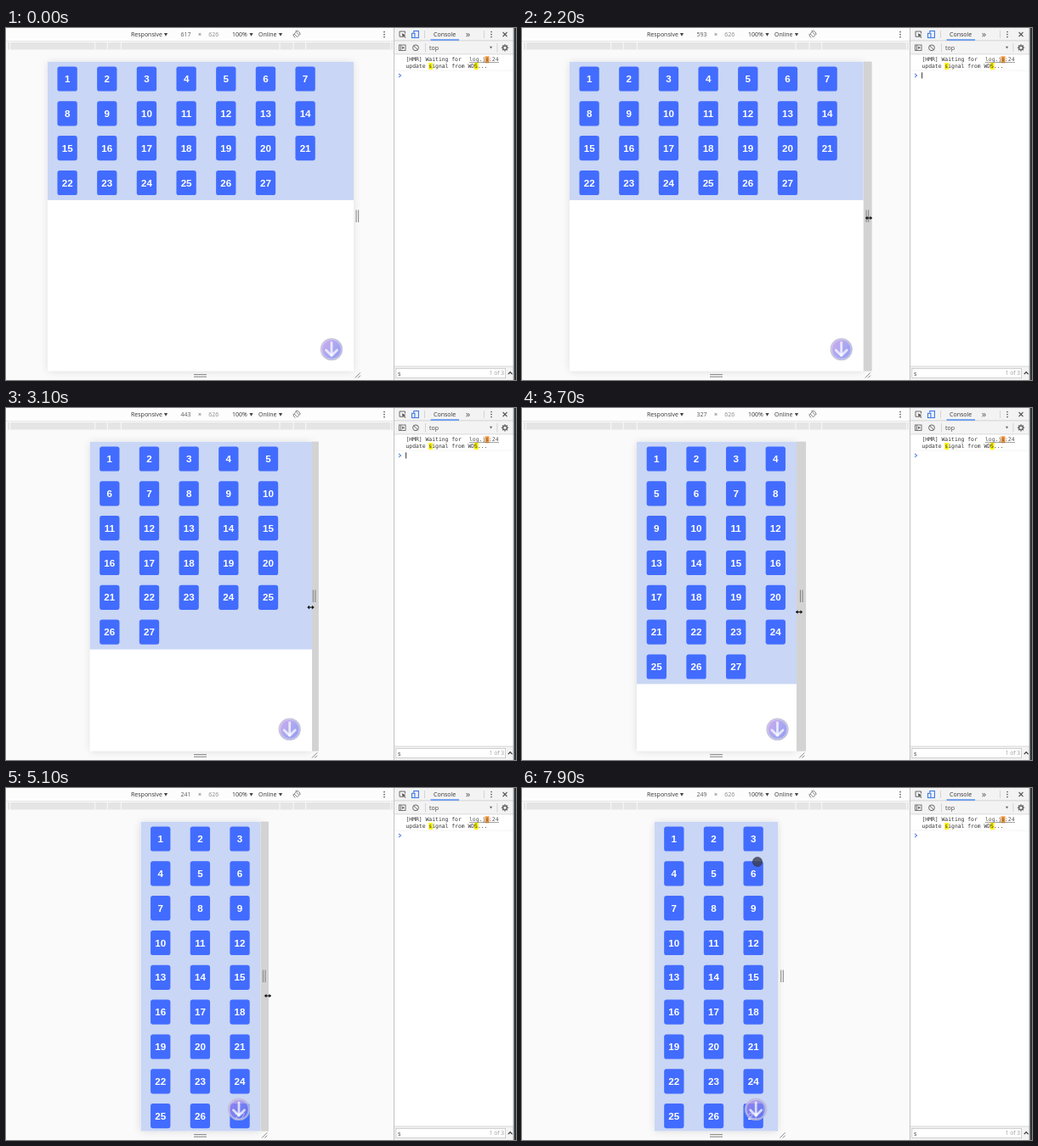
Write an HTML page with a canvas that moves like this. It is 600 px wide and 415 px high and loops after 8 s.

```html
<!DOCTYPE html>
<html lang="en">
<head>
<meta charset="utf-8">
<title>Responsive grid</title>
<style>
html, body { margin: 0; width: 100%; height: 100%; overflow: hidden; background: #fafafa; }
canvas { display: block; width: 600px; height: 415px; }
</style>
</head>
<body>
<canvas id="stage"></canvas>
<script>
const LOOP = 8000, STEP = 100, SCALE = 0.5833;
const TOP = 39.6, BOTTOM = 404.6, MID = 228.7;
const UI = '"Open Sans", "Noto Sans", sans-serif';
const MONO = '"DejaVu Sans Mono", monospace';
const BOLD = '"Liberation Sans", Arial, sans-serif';

const canvas = document.getElementById('stage');
const ratio = window.devicePixelRatio || 1;
canvas.width = 600 * ratio;
canvas.height = 415 * ratio;
const c = canvas.getContext('2d');
c.scale(ratio, ratio);

// time, shown width, page left, page right, button x
const sizes = [
  [2000, 617, 48.8, 409, 383],
  [2200, 593, 55.8, 401.8, 375.7],
  [2800, 502, 82, 376, 350],
  [3100, 443, 98.5, 360, 333.7],
  [3700, 327, 135, 323, 300.5],
  [4100, 277, 148, 309.5, 284],
  [4600, 248, 156.4, 301, 275.3],
  [5100, 241, 158.4, 299.6, 274],
  [5500, 241, 158.4, 299.6, 274],
  [5800, 249, 155.5, 301, 275.2]
];
// time, x, y
const pointer = [
  [1100, 590, 300], [1400, 480, 250], [1700, 414, 223], [2000, 414, 223],
  [2200, 408, 224], [2800, 380, 231], [3100, 358.5, 235], [3700, 326, 240.5],
  [4600, 309, 244], [5100, 308, 245], [5500, 308, 245], [5800, 311, 244],
  [6400, 208, 36], [6500, 201, 27], [7200, 201, 27], [7900, 277, 87]
];

function sample(keys, t) {
  if (t <= keys[0][0]) return keys[0];
  const i = keys.findIndex(k => k[0] >= t);
  if (i < 0) return keys[keys.length - 1];
  const a = keys[i - 1], b = keys[i], p = (t - a[0]) / (b[0] - a[0]);
  return a.map((v, n) => v + (b[n] - v) * p);
}

function rect(x, y, w, h, color) {
  c.fillStyle = color;
  c.fillRect(x, y, w, h);
}

function line(points, color, width = 1) {
  c.strokeStyle = color;
  c.lineWidth = width;
  c.beginPath();
  for (let i = 0; i < points.length; i += 2) c.lineTo(points[i], points[i + 1]);
  c.stroke();
}

function shape(points, color) {
  c.fillStyle = color;
  c.beginPath();
  for (let i = 0; i < points.length; i += 2) c.lineTo(points[i], points[i + 1]);
  c.closePath();
  c.fill();
}

function disc(x, y, r, fill, stroke, width = 1) {
  c.beginPath();
  c.arc(x, y, r, 0, Math.PI * 2);
  if (fill) { c.fillStyle = fill; c.fill(); }
  if (stroke) { c.strokeStyle = stroke; c.lineWidth = width; c.stroke(); }
}

function text(str, x, y, font, color, align = 'left') {
  c.font = font;
  c.fillStyle = color;
  c.textAlign = align;
  c.textBaseline = 'alphabetic';
  c.fillText(str, x, y);
}

function caretDown(x, y, r, color) {
  shape([x - r, y - r * 0.8, x + r, y - r * 0.8, x, y + r], color);
}

function dots(x, y) {
  for (let i = -1; i <= 1; i++) disc(x, y + i * 3, 0.85, '#555');
}

function toolbar(width) {
  rect(0, 0, 456, 15.5, '#fdfdfd');
  const font = '7px ' + UI;
  text('Responsive', 147, 10.2, font, '#333');
  text(Math.round(width), 211.5, 10.2, font, '#5a5a5a', 'center');
  text('×', 228, 10.2, font, '#5a5a5a', 'center');
  text('626', 244.3, 10.2, font, '#888', 'center');
  text('100%', 266, 10.2, font, '#333');
  text('Online', 297, 10.2, font, '#333');
  for (const x of [188, 288.5, 323]) caretDown(x, 7.6, 2.1, '#444');
  c.save();
  c.translate(342, 7.6);
  c.rotate(-Math.PI / 4);
  c.strokeStyle = '#666';
  c.lineWidth = 0.8;
  c.strokeRect(-1.6, -2.6, 3.2, 5.2);
  c.beginPath();
  c.arc(0, 0, 4, -1.2, 0.9);
  c.moveTo(-3.7, 1.5);
  c.arc(0, 0, 4, 2.75, 4.1);
  c.stroke();
  c.restore();
  dots(445, 7.6);
  rect(0, 15.2, 456, 0.8, '#e2e2e2');
  rect(2, 17, 453, 8.5, '#e5e5e5');
  for (const w of [320, 375, 425, 768])
    for (const side of [-1, 1])
      rect(MID + side * w * SCALE / 2 - 0.5, 17, 1, 8.5, '#fafafa');
}

function grid(left, right, cols) {
  const cell = 80 * SCALE, row = 70 * SCALE;
  const rows = Math.ceil(27 / cols);
  rect(left, TOP, right - left, rows * row, '#c9d6f5');
  for (let i = 0; i < 27; i++) {
    const x = left + 20 * SCALE + (i % cols) * cell;
    const y = TOP + 10 * SCALE + Math.floor(i / cols) * row;
    c.fillStyle = '#426cff';
    c.beginPath();
    c.roundRect(x, y, 40 * SCALE, 50 * SCALE, 2.9);
    c.fill();
    text(i + 1, x + 20 * SCALE, y + 18.7, 'bold 11.67px ' + BOLD, '#fff', 'center');
  }
}

function downButton(x, y) {
  c.save();
  c.globalAlpha = 0.72;
  const g = c.createLinearGradient(x - 10, y - 8, x + 10, y + 8);
  g.addColorStop(0, '#b48ae8');
  g.addColorStop(0.5, '#8a86ea');
  g.addColorStop(1, '#6f78ea');
  disc(x, y, 12.5, g, '#c3c3d2', 1.6);
  disc(x, y, 11.4, null, '#e6e4f4', 0.8);
  c.lineCap = c.lineJoin = 'round';
  line([x, y - 8, x, y + 7], '#fff', 2.8);
  line([x - 6.5, y + 1, x, y + 7.5, x + 6.5, y + 1], '#fff', 2.8);
  c.restore();
}

function page(left, right, button, width, hover) {
  const edge = MID + width * SCALE / 2;
  c.save();
  c.shadowColor = 'rgba(0,0,0,0.13)';
  c.shadowBlur = 9 * ratio;
  rect(left, TOP, right - left, BOTTOM - TOP, '#fff');
  c.restore();
  if (hover) rect(right, TOP, edge + 10 - right, BOTTOM - TOP, '#d3d3d3');
  c.save();
  c.beginPath();
  c.rect(left, TOP, right - left, BOTTOM - TOP);
  c.clip();
  grid(left, right, Math.floor((right - left) / SCALE / 80));
  downButton(button, 378.8);
  c.restore();

  const h = edge + 4.7;
  line([h - 1.3, 214.5, h - 1.3, 229], '#777', 0.9);
  line([h + 1.3, 214.5, h + 1.3, 229], '#777', 0.9);
  line([221, 408.6, 236, 408.6], '#777', 0.9);
  line([221, 411.2, 236, 411.2], '#777', 0.9);
  line([h - 2.6, 412.5, h + 3.6, 406.3], '#777', 0.9);
  line([h + 0.8, 412.5, h + 3.6, 409.7], '#777', 0.9);
}

function devtools(caret) {
  rect(456, 0, 144, 415, '#fff');
  rect(456, 0, 141, 31, '#f3f3f3');
  rect(456, 14.5, 141, 0.8, '#ccc');
  rect(456, 30.5, 141, 0.8, '#d4d4d4');
  rect(456, 0, 0.9, 415, '#bdbdbd');

  // tab strip
  line([467, 10.2, 463, 10.2, 463, 4, 469.5, 4, 469.5, 6.5], '#5a5a5a', 0.9);
  shape([465.7, 6.3, 470.5, 8.3, 468.5, 9, 470.4, 11, 469.6, 11.7, 467.7, 9.8, 467, 11.6], '#5a5a5a');
  c.strokeStyle = '#3b78e7';
  c.lineWidth = 1.1;
  c.strokeRect(479.8, 3.5, 5.6, 8);
  rect(477, 5.8, 4.2, 6.2, '#f3f3f3');
  c.strokeRect(477.5, 6.3, 3.4, 5.2);
  rect(492, 3, 0.8, 9, '#ccc');
  text('Console', 503, 10.2, '7px ' + UI, '#333');
  rect(499.5, 13.3, 33.5, 1.4, '#4285f4');
  text('»', 543.5, 11, '11px ' + UI, '#555', 'center');
  rect(562, 3, 0.8, 9, '#ccc');
  dots(571, 7.5);
  line([584.5, 5, 589.5, 10], '#555', 1.1);
  line([589.5, 5, 584.5, 10], '#555', 1.1);

  // filter strip
  c.strokeStyle = '#666';
  c.lineWidth = 0.9;
  c.strokeRect(462.5, 20, 7.5, 6.5);
  line([464.5, 20, 464.5, 26.5], '#666', 0.9);
  shape([466, 21.4, 469, 23.2, 466, 25], '#666');
  disc(482, 23.3, 3.4, null, '#666', 1);
  line([479.7, 21, 484.4, 25.7], '#666', 1);
  rect(493, 18, 0.8, 10.5, '#ccc');
  text('top', 498, 25.8, '7px ' + UI, '#444');
  caretDown(570.5, 23, 1.6, '#666');
  rect(577.5, 18, 0.8, 10.5, '#ccc');
  for (let i = 0; i < 8; i++) {
    const a = i * Math.PI / 4, x = Math.cos(a), y = Math.sin(a);
    line([587 + x * 2.5, 23.3 + y * 2.5, 587 + x * 4.1, 23.3 + y * 4.1], '#666', 1.4);
  }
  disc(587, 23.3, 2.3, null, '#666', 1.4);

  // messages
  const mono = '6.38px ' + MONO, ch = 3.84;
  rect(471 + 7 * ch - 0.5, 41, 4.6, 8, '#fff200');
  rect(471 + 21 * ch - 0.8, 41, 4.8, 8, '#fff200');
  rect(545 + 5 * ch - 0.6, 33.3, 4.8, 8, '#ff9632');
  text('[HMR] Waiting for', 470.5, 39.2, mono, '#333');
  text('update signal from WDS...', 470.5, 46.7, mono, '#333');
  text('log.js:24', 545, 39.2, mono, '#555');
  rect(545, 40.2, 35, 0.6, '#666');
  rect(457, 49.8, 140, 0.6, '#f0f0f0');
  line([462, 53.8, 464.6, 56, 462, 58.2], '#5b86e8', 1.1);
  if (caret) rect(470.2, 52.3, 0.9, 7.2, '#222');

  // search
  rect(457, 399, 140, 16, '#f3f3f3');
  rect(457, 398.6, 140, 0.8, '#ccc');
  rect(458.5, 401, 129.5, 12, '#bbb');
  rect(459.2, 401.7, 128.1, 10.6, '#fff');
  text('s', 461, 409.5, '7px ' + UI, '#333');
  text('1 of 3', 586, 409.3, '6.6px ' + UI, '#999', 'right');
  line([590.8, 408.2, 593.2, 405.6, 595.6, 408.2], '#333', 1.2);

  rect(596.6, 0, 1, 415, '#9da0a3');
  rect(597.6, 0, 2.4, 415, '#2d3236');
}

function resizeCursor(x, y) {
  line([x - 3, y, x + 3, y], '#111', 1.2);
  shape([x - 4.2, y, x - 1.5, y - 2.2, x - 1.5, y + 2.2], '#111');
  shape([x + 4.2, y, x + 1.5, y - 2.2, x + 1.5, y + 2.2], '#111');
}

function handCursor(x, y) {
  shape([x - 1.4, y - 4, x, y - 4, x + 0.2, y - 1.2, x + 3, y - 0.4,
    x + 2.7, y + 3.6, x - 1, y + 3.6, x - 2.8, y + 0.4, x - 1.4, y], '#111');
}

function arrowCursor(x, y) {
  shape([x, y, x, y + 8, x + 2, y + 6.2, x + 3.4, y + 9, x + 4.6, y + 8.4,
    x + 3.3, y + 5.7, x + 5.8, y + 5.6], '#111');
}

function cursor(t, left, right, hover) {
  if (t < pointer[0][0]) return;
  const [, x, y] = sample(pointer, t);
  if (hover) resizeCursor(x, y);
  else if (x > left && x < right && y > TOP) disc(x, y, 5.6, 'rgba(58,62,78,0.8)', 'rgba(40,44,60,0.6)', 0.8);
  else if (y < 28) handCursor(x, y);
  else arrowCursor(x, y);
}

function draw(t) {
  const [, width, left, right, button] = sample(sizes, t);
  const hover = t >= 1700 && t < 5900;
  const blink = t % 900;
  rect(0, 0, 600, 415, '#fafafa');
  toolbar(width);
  page(left, right, button, width, hover);
  devtools(blink >= 125 && blink < 575);
  cursor(t, left, right, hover);
}

const start = performance.now();
function tick() {
  const t = (performance.now() - start) % LOOP;
  draw(Math.floor(t / STEP) * STEP);
  requestAnimationFrame(tick);
}
tick();
</script>
</body>
</html>
```
